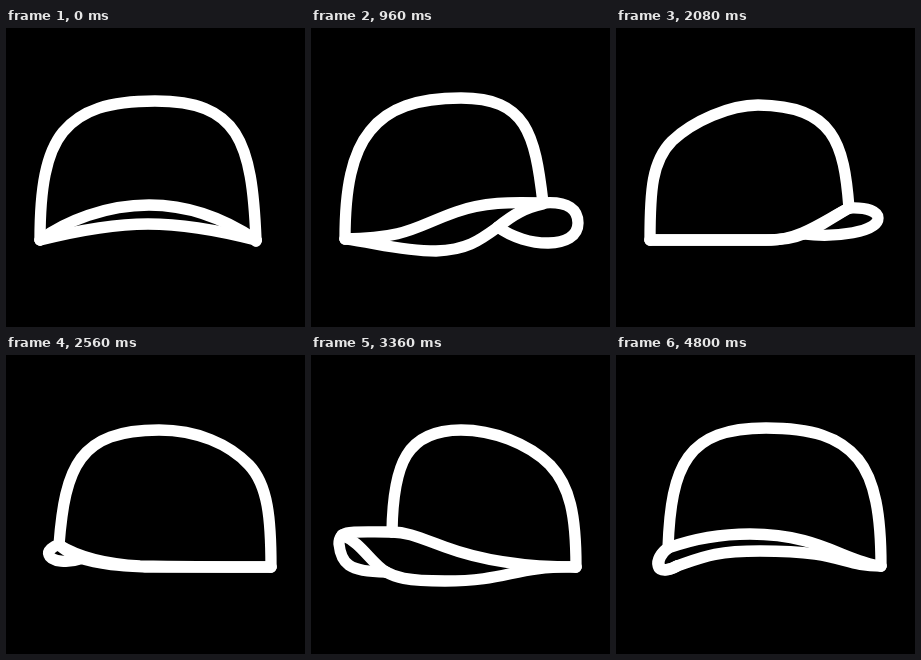
An HTML page that plays this animation: 299x299 px, repeating every 4.96 s.

```html
<!DOCTYPE html>
<html lang="en">
<head>
<meta charset="utf-8">
<title>Turning cap</title>
<style>
  html, body { margin: 0; width: 100%; height: 100%; overflow: hidden; background: #000; }
  svg { display: block; width: 100%; height: 100%; }
  path { fill: none; stroke: #fff; stroke-width: 11.3; stroke-linecap: round; stroke-linejoin: round; }
</style>
</head>
<body>
<svg viewBox="0 0 299 299"><g id="cap"></g></svg>
<script>
const STEP = 160, COUNT = 31, HALF = 15;

// Each stroke: step -> cubic path, blended between the listed steps.
const crown = {
  0: 'M34 212C34 160 40 125 57 104C75 82 103 73 149 73C232 73 246 112 250 212',
  1: 'M34 211C34 160 40 125 57 104C75 82 103 73 149 73C228 73 244 110 247 193',
  6: 'M34 211C34 160 41 125 59 103C77 80 106 70 150 70C215 70 224 105 232 175',
  10: 'M34 212C34 160 40 131 60 110C82 88 118 75 149 75C203 75 217 108 218 177',
  13: 'M34 212C34 162 36 133 56 113C77 93 114 77 142 77C218 78 228 115 233 180',
  15: 'M34 212C34 164 37 130 56 110C76 89 108 75 146 75C226 75 240 112 246 190'
};
const band = {
  0: 'M34 212C60 193 100 177 143 177C185 177 222 193 250 212',
  1: 'M34 211C70 207 95 179 165 179C195 179 222 184 247 193',
  6: 'M34 211C98 210 105 198 145 184C172 174 200 174 232 175',
  10: 'M34 212C88 212 130 205 165 192C192 182 203 177 218 177',
  13: 'M34 212C80 212 110 212 155 212C185 211 206 194 233 180',
  15: 'M34 212C80 212 115 212 165 211C200 209 225 203 246 190'
};
const edge = {
  0: 'M34 212C70 203 105 196 142 196C180 196 215 203 250 212',
  1: 'M34 211C75 211 70 196 155 196C200 196 212 202 238 211',
  6: 'M34 211C65 215 90 223 125 223C155 222 168 213 187 199',
  10: 'M34 212C98 211 100 226 165 226C205 226 215 222 224 217',
  13: 'M34 212C80 212 110 212 150 212C165 212 178 210 187 206',
  15: 'M34 212C80 212 115 212 160 212C180 211 205 210 225 203'
};
const peak = {
  0: 'M250 212C250 212 250 213 250 213C250 213 250 212 250 212',
  1: 'M247 193C255 198 258 206 257 210C256 218 245 215 238 211',
  3: 'M241 186C258 187 267 192 268 203C268 219 240 220 218 206',
  4: 'M238 182C264 180 277 188 278 200C278 220 236 222 207 204',
  6: 'M232 175C258 173 267 182 267 195C267 222 215 220 187 199',
  10: 'M218 177C258 177 271 174 271 189C269 208 262 217 224 217',
  13: 'M233 180C252 179 262 184 262 190C262 204 220 210 187 206',
  15: 'M246 190C252 191 258 196 256 200C254 207 236 208 225 204'
};
const fold = {
  0: 'M250 212C250 212 250 213 250 213',
  1: 'M238 211C258 222 262 205 247 193',
  6: 'M187 199C203 186 214 180 232 176',
  10: 'M224 217C240 207 248 188 268 180',
  13: 'M187 206C203 200 215 190 233 180',
  15: 'M225 203C232 200 239 196 246 190'
};

const cap = document.getElementById('cap');
const strokes = [crown, band, edge, peak, fold].map(poses => {
  const path = document.createElementNS('http://www.w3.org/2000/svg', 'path');
  cap.append(path);
  return { poses, keys: Object.keys(poses).map(Number), path };
});

function blend({ poses, keys }, pos) {
  const i = Math.max(1, keys.findIndex(k => k >= pos));
  const from = keys[i - 1], to = keys[i];
  const mix = (pos - from) / (to - from);
  const end = poses[to].match(/\d+/g);
  let n = 0;
  return poses[from].replace(/\d+/g, v => +v + (end[n++] - v) * mix);
}

// The second half of the turn mirrors the first.
function draw(step) {
  const flipped = step > HALF;
  const pos = flipped ? COUNT - step : step;
  cap.setAttribute('transform', flipped ? 'translate(299 0) scale(-1 1)' : '');
  for (const s of strokes) s.path.setAttribute('d', blend(s, pos));
}

const start = performance.now();
function tick() {
  draw(Math.floor((performance.now() - start) / STEP) % COUNT);
  requestAnimationFrame(tick);
}
tick();
</script>
</body>
</html>
```
